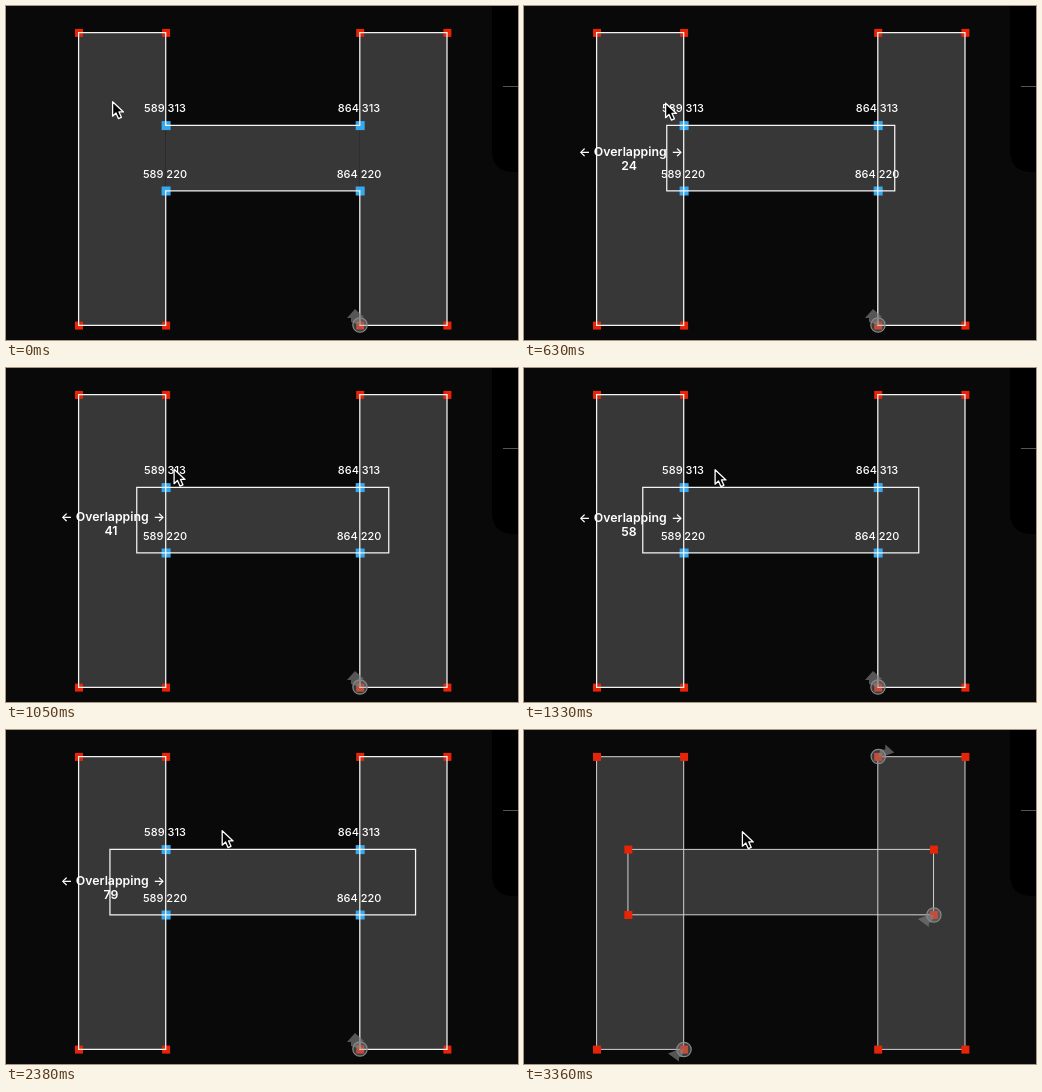
An HTML page that plays this animation: 512 px wide and 334 px high, repeating every 3430 ms.

```html
<!DOCTYPE html>
<html lang="en">
<head>
<meta charset="utf-8">
<title>Overlapping bars</title>
<style>
  html, body { margin: 0; width: 100%; height: 100%; overflow: hidden; background: #090909; }
  svg { display: block; width: 100vw; height: 100vh; }
  text { fill: #fff; font-family: Inter, "Liberation Sans", sans-serif; text-anchor: middle; }
  .coords text { font-size: 11px; font-weight: 500; }
  .label text { font-size: 12.3px; font-weight: 600; }
  .bars { fill: #373737; }
  .lines { fill: none; stroke: #f4f4f4; stroke-width: 1.25; }
  .thin { stroke: #d2d2d2; stroke-width: 1; }
  .red { fill: #e62508; }
  .blue { fill: #36a9ee; }
  .marker { fill: #777; fill-opacity: .7; }
  .marker circle { fill: #8a8a8a; fill-opacity: .4; stroke: #8a8a8a; stroke-width: 1.2; }
</style>
</head>
<body>
<svg id="stage" viewBox="0 0 512 334">
  <rect width="512" height="334" fill="#090909"/>
  <path d="M486 0V144Q486 166 508 166H512V0Z" fill="#000"/>
  <path d="M497 80.5H512" stroke="#555"/>
  <g class="bars" id="bars"></g>
  <g id="handles"></g>
  <path id="outline" class="lines"/>
  <g id="markers" class="marker"></g>
  <g id="coords" class="coords"></g>
  <g id="label" class="label">
    <text x="60.7">←</text>
    <text x="106.3">Overlapping</text>
    <text x="153">→</text>
    <text id="amount" x="105" y="14"></text>
  </g>
  <path id="cursor" d="M.6 .8V15.2L4 12L6.4 17.6L9.4 16.3L7 10.9H11.5Z"
    fill="#050505" stroke="#fff" stroke-width="1.3" stroke-linejoin="round"/>
</svg>
<script>
const LOOP = 3430, STEP = 70, DRAG = 210, DONE = 2590;
const LEFT = 72.6, INNER_LEFT = 159.7, INNER_RIGHT = 353.8, RIGHT = 441;
const TOP = 26.7, BAR_TOP = 119.4, BAR_BOTTOM = 184.8, BOTTOM = 319.4;
const SCALE = (INNER_RIGHT - INNER_LEFT) / (864 - 589);

const $ = id => document.getElementById(id);
const box = (x1, y1, x2, y2) => `M${x1} ${y1}H${x2}V${y2}H${x1}Z`;
const corners = (x1, y1, x2, y2) => [[x1, y1], [x2, y1], [x1, y2], [x2, y2]];

const columns = box(LEFT, TOP, INNER_LEFT, BOTTOM) + box(INNER_RIGHT, TOP, RIGHT, BOTTOM);
const letter = `M${LEFT} ${TOP}H${INNER_LEFT}V${BAR_TOP}H${INNER_RIGHT}V${TOP}H${RIGHT}V${BOTTOM}` +
  `H${INNER_RIGHT}V${BAR_BOTTOM}H${INNER_LEFT}V${BOTTOM}H${LEFT}Z`;
const columnCorners = [
  ...corners(LEFT, TOP, INNER_LEFT, BOTTOM),
  ...corners(INNER_RIGHT, TOP, RIGHT, BOTTOM)
];

// Keyframes: time, then values
const overlapKeys = [[140, 0], [630, 24], [700, 27], [1050, 41], [1260, 57], [1330, 58],
  [1750, 75], [1820, 78], [1890, 81], [1960, 79]];
const cursorKeys = [[140, 106, 95], [630, 141, 96.5], [1050, 167.5, 100.5], [1330, 190.5, 101],
  [1750, 213.8, 101], [1890, 217, 101], [1960, 216.3, 101]];
const labelKeys = [[210, 149.5], [630, 150], [1050, 152.5], [1330, 154], [1750, 154.5]];

function sample(keys, t) {
  const next = keys.findIndex(k => k[0] > t);
  if (next === 0) return keys[0].slice(1);
  if (next < 0) return keys[keys.length - 1].slice(1);
  const a = keys[next - 1], b = keys[next];
  const p = (t - a[0]) / (b[0] - a[0]);
  return a.slice(1).map((v, i) => v + (b[i + 1] - v) * p);
}

function cursorAt(t) {
  if (t >= 3360) return [217.8, 101];
  if (t >= 2380) return [215.6, 100];
  return sample(cursorKeys, t);
}

const handles = (points, color, size) => points.map(([x, y]) =>
  `<rect class="${color}" x="${x + .4 - size / 2}" y="${y + .2 - size / 2}" width="${size}" height="${size}"/>`
).join("");

const marker = (x, y, arrow) =>
  `<g transform="translate(${x} ${y})"><path d="${arrow}"/><circle r="7.2"/></g>`;

const upArrow = "M-5 -16L4 -8L0 -7V0L-9 -3V-7L-13 -7Z";
const rightArrow = "M7 -12L16 -4L5 0L0 0L2 -7L7 -7Z";
const leftArrow = "M-16 4L-6 0L0 0L-2 7L-5 8V12Z";

$("coords").innerHTML = [[159, 106, "589 313"], [353, 106, "864 313"],
  [159, 171.5, "589 220"], [353, 171.5, "864 220"]]
  .map(([x, y, s]) => `<text x="${x}" y="${y}">${s}</text>`).join("");

function render(time) {
  const t = Math.floor(time % LOOP / STEP) * STEP;
  const dragging = t >= DRAG && t < DONE, done = t >= DONE;
  const overlap = done ? 79 : Math.round(sample(overlapKeys, t)[0]);
  const x1 = INNER_LEFT - overlap * SCALE, x2 = INNER_RIGHT + overlap * SCALE;
  const bar = [x1, BAR_TOP, x2, BAR_BOTTOM];

  $("bars").innerHTML = `<path d="${columns}"/><path d="${box(...bar)}"/>`;
  $("outline").setAttribute("d", t < DRAG ? letter : columns + box(...bar));
  $("outline").setAttribute("class", done ? "lines thin" : "lines");
  $("stage").insertBefore($("outline"), done ? $("handles") : $("markers"));
  if (!done) $("stage").insertBefore($("handles"), $("outline"));

  $("handles").innerHTML = handles(columnCorners, "red", 8) + (done
    ? handles(corners(...bar), "red", 8)
    : handles(corners(INNER_LEFT, BAR_TOP, INNER_RIGHT, BAR_BOTTOM), "blue", 9));
  $("markers").innerHTML = done
    ? marker(354.3, 26.5, rightArrow) + marker(160, 319.5, leftArrow) + marker(x2 + .3, 185, leftArrow)
    : marker(354, 319, upArrow);

  $("coords").style.display = done ? "none" : "";
  $("label").style.display = dragging ? "" : "none";
  $("label").setAttribute("transform", `translate(0 ${sample(labelKeys, t)[0]})`);
  $("amount").textContent = overlap;
  $("cursor").setAttribute("transform", `translate(${cursorAt(t).join(" ")})`);
}

const start = performance.now();
function tick() {
  render(performance.now() - start);
  requestAnimationFrame(tick);
}
tick();
</script>
</body>
</html>
```
